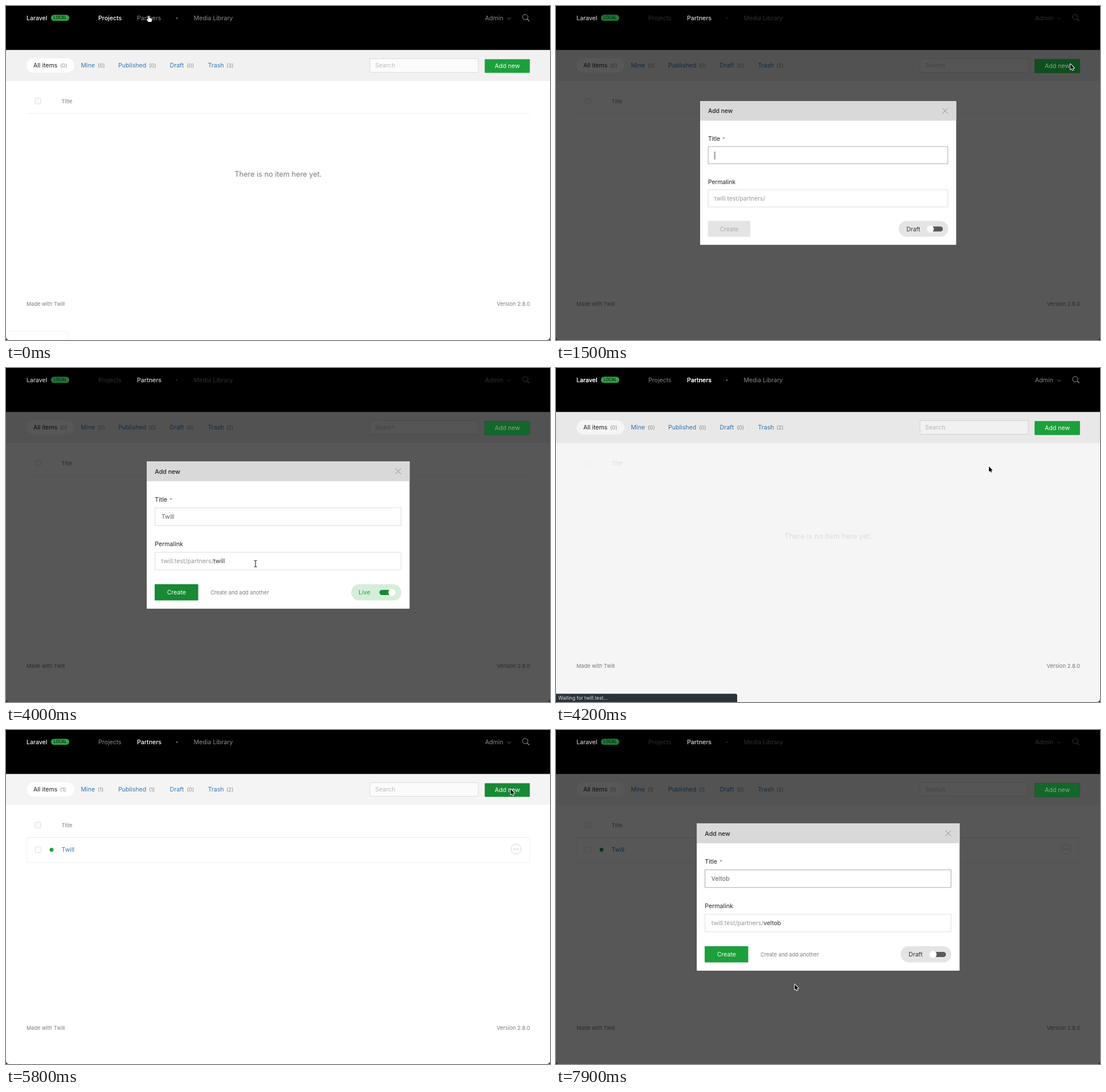
Animation, 955 px wide and 587 px high, one loop 8 s. Source, as an HTML page with a canvas:

```html
<!DOCTYPE html>
<html lang="en">
<head>
<meta charset="utf-8">
<title>Partners listing</title>
<style>
  html, body { margin: 0; width: 100%; height: 100%; overflow: hidden; background: #fff; }
  canvas { display: block; width: 955px; height: 587px; }
</style>
</head>
<body>
<canvas id="stage"></canvas>
<script>
const W = 955, H = 587, LOOP = 8000, STEP = 100;
const FONT = 'Inter, Roboto, sans-serif';
const GREEN = '#1d9f3c', GREEN_DARK = '#188934', BLUE = '#3278b8';
const NAME = 'Veltob';

const canvas = document.getElementById('stage');
const ctx = canvas.getContext('2d');
const dpr = window.devicePixelRatio || 1;
canvas.width = W * dpr;
canvas.height = H * dpr;

// time, x, y, pointer kind
const PATH = [
  [0, 251, 17, 'hand'], [500, 251, 17, 'hand'], [700, 330, 28, 'arrow'],
  [1300, 903, 102, 'arrow'], [1500, 903, 102, 'arrow'], [2000, 290, 262, 'beam'],
  [2200, 290, 262, ''], [3000, 297, 262, 'beam'], [3400, 668, 392, 'hand'],
  [3500, 668, 392, 'hand'], [3800, 310, 391, 'hand'], [3900, 345, 380, 'beam'],
  [4000, 438, 344, 'beam'], [4100, 600, 260, 'arrow'], [4200, 760, 173, 'arrow'],
  [4500, 876, 110, 'arrow'], [5300, 876, 110, 'arrow'], [5700, 886, 104, 'arrow'],
  [5900, 886, 104, 'arrow'], [6200, 334, 262, 'beam'], [6600, 297, 256, 'beam'],
  [7000, 297, 256, ''], [7700, 297, 256, 'beam'], [7800, 350, 345, 'beam'],
  [7900, 419, 447, 'arrow'], [8000, 419, 447, 'arrow']
];

// time, visibility of the dialog and its backdrop
const DIALOG = [
  [0, 0], [1300, 0], [1400, .5], [1500, 1], [4000, 1], [4100, .4], [4200, .06],
  [4300, 0], [5800, 0], [5900, .5], [6000, 1], [8000, 1]
];

function segment(keys, t) {
  let i = 0;
  while (i < keys.length - 2 && t >= keys[i + 1][0]) i++;
  const a = keys[i], b = keys[i + 1];
  return { a, b, p: (t - a[0]) / (b[0] - a[0]) };
}

const mix = (a, b, p) => a + (b - a) * p;

function track(keys, t) {
  const { a, b, p } = segment(keys, t);
  return mix(a[1], b[1], p);
}

function pointerAt(t) {
  const { a, b, p } = segment(PATH, t);
  const e = p * p * (3 - 2 * p);
  return { x: mix(a[1], b[1], e), y: mix(a[2], b[2], e), kind: a[3] };
}

// Text is placed by the middle of its capitals.
function text(str, x, y, color, size = 10.6, weight = 400, align = 'left') {
  ctx.font = `${weight} ${size}px ${FONT}`;
  ctx.fillStyle = color;
  ctx.textAlign = align;
  ctx.fillText(str, x, y + size * .364);
  return ctx.measureText(str).width;
}

function box(x, y, w, h, fill, stroke, r = 0) {
  ctx.beginPath();
  ctx.roundRect(x, y, w, h, r);
  if (fill) { ctx.fillStyle = fill; ctx.fill(); }
  if (stroke) { ctx.strokeStyle = stroke; ctx.lineWidth = 1; ctx.stroke(); }
}

function disc(x, y, r, fill, stroke) {
  box(x - r, y - r, 2 * r, 2 * r, fill, stroke, r);
}

function lines(color, width, ...parts) {
  ctx.strokeStyle = color;
  ctx.lineWidth = width;
  ctx.beginPath();
  for (const [x, y, ...rest] of parts) {
    ctx.moveTo(x, y);
    for (let i = 0; i < rest.length; i += 2) ctx.lineTo(rest[i], rest[i + 1]);
  }
  ctx.stroke();
}

function brand(color, badge) {
  text('Laravel', 36, 21, color, 10.5, 500);
  box(79, 15.5, 32, 10.5, badge, null, 5.2);
  text('LOCAL', 95, 20.8, '#0b2a12', 6.9, 600, 'center');
}

function nav(partners) {
  box(0, 0, W, 77.4, '#000');
  brand('#f4f4f4', '#2aa745');
  text('Projects', 162, 21, partners ? '#8c8c8c' : '#fff', 10.6, partners ? 400 : 500);
  text('Partners', 230, 21, partners ? '#fff' : '#8c8c8c', 10.6, partners ? 500 : 400);
  disc(300, 21.5, 1.4, '#666');
  text('Media Library', 329.5, 21, '#8c8c8c');
  text('Admin', 841, 21, '#8c8c8c');
  lines('#777', 1, [880, 20.5, 883, 23.5, 886, 20.5]);
  disc(911.5, 19.5, 4.7, null, '#a0a0a0');
  lines('#a0a0a0', 1.1, [915, 23, 918.5, 26.5]);
}

function addButton(fill, color) {
  box(840.4, 93.4, 79.2, 24.2, fill, null, 1);
  text('Add new', 880, 105.3, color, 10.6, 400, 'center');
}

function filters(counts, strip, pill, hover) {
  box(0, 77.4, W, 54.4, strip);
  box(36, 92, 84, 25, pill, null, 12.5);
  const tabs = [['All items', 48, 95], ['Mine', 131.5, 161], ['Published', 197, 251],
    ['Draft', 287.5, 317.5], ['Trash', 354.5, 387]];
  tabs.forEach(([label, x, countX], i) => {
    text(label, x, 104.3, i ? BLUE : '#222');
    text(`(${counts[i]})`, countX, 104.5, '#8a8a8a', 9.2);
  });
  box(639, 92.5, 190, 24, '#fbfbfb', '#dcdcdc');
  text('Search', 648, 104.3, '#bdbdbd');
  addButton(hover ? GREEN_DARK : GREEN, '#f2fff5');
}

function listing(t, filled) {
  const busy = t >= 4200 && t < 4500;
  ctx.globalAlpha = busy ? .2 : 1;
  box(51, 162, 10, 10, '#fafafa', '#dedede', 1);
  text('Title', 97.5, 167.3, '#7c7c7c', 9.2);
  lines('#f0f0f0', 1, [36, 188.8, 920, 188.8]);
  if (!filled) {
    text('There is no item here yet.', 477.7, 295.8, '#7c7c7c', 12.75, 400, 'center');
  } else {
    ctx.globalAlpha = Math.min(1, (t - 4700) / 300);
    box(36.5, 189, 883, 44, null, '#f0f0f0');
    box(51.5, 205.5, 10, 10, '#fff', '#dedede', 1);
    disc(80, 210.5, 3.4, GREEN);
    text('Twill', 97.5, 210.5, BLUE);
    disc(895.5, 209.3, 8.8, '#fff', '#d6d6d6');
    for (const dx of [-3.4, 0, 3.4]) disc(895.5 + dx, 209.3, .8, '#888');
  }
  ctx.globalAlpha = 1;
}

function page(t, hover) {
  const partners = t >= 500, reloaded = t >= 4500;
  const counts = reloaded ? [1, 1, 1, 0, 2] : [0, 0, 0, 0, partners ? 2 : 3];
  box(0, 0, W, H, '#fff');
  nav(partners);
  filters(counts, reloaded ? '#f4f4f4' : '#f1f1f1', '#fff', hover);
  listing(t, t >= 4800);
  text('Made with Twill', 36, 523.5, '#7c7c7c', 9.2);
  text('Version 2.8.0', 920, 523.5, '#7c7c7c', 9.45, 400, 'right');
}

function backdrop(k, hover) {
  box(0, 0, W, H, `rgba(0,0,0,${.66 * k})`);
  if (k < .1) {
    brand('#f4f4f4', '#2aa745');
    text('Partners', 230, 21, '#fff', 10.6, 500);
    addButton(GREEN, '#f2fff5');
    return;
  }
  ctx.globalAlpha = k;
  brand('#b4b4b4', '#1c7a33');
  text('Partners', 230, 21, '#c4c4c4', 10.6, 500);
  addButton(hover ? '#0f4f1e' : '#13672a', '#86a58d');
  ctx.globalAlpha = 1;
}

function toggle(live) {
  box(live ? 606 : 605, 380, live ? 88 : 89, 28.5, live ? '#d5eeda' : '#e4e4e4', null, 14.2);
  text(live ? 'Live' : 'Draft', 619, 394.5, live ? GREEN : '#333');
  box(live ? 655.5 : 660, 390, live ? 26 : 24.5, 9, live ? GREEN_DARK : '#595959', null, 4.5);
  disc(live ? 677.5 : 662, 394.5, 6.2, '#fff');
}

function fields(t) {
  const first = t < 5000;
  const start = first ? 2200 : 7000;
  let title = '', slug = '';
  if (first) {
    const n = t < 2200 ? 0 : t < 2500 ? 1 : Math.min(5, 2 + (t - 2500) / STEP);
    title = 'Twill'.slice(0, n);
    slug = t < 2300 ? '' : t < 3000 ? 't' : 'twill';
  } else {
    title = NAME.slice(0, Math.max(0, (t - start) / STEP + 1));
    slug = t < 7700 ? '' : NAME.toLowerCase();
  }
  const caret = first ? t < 2200 : t < 6800;
  return { title, slug, caret, ready: t >= start, live: first && t >= 3400,
    focus: !first || t < 3400, pressed: first && t >= 3700 };
}

function dialog(t, k) {
  const f = fields(t);
  const s = t === 1400 || t === 5900 ? .955 : t === 1500 || t === 6000 ? .974 : 1;
  ctx.save();
  ctx.globalAlpha = k;
  ctx.translate(478, 293.5);
  ctx.scale(s, s);
  ctx.translate(-478, -293.5);
  box(247, 164, 461.5, 259, '#fff', null, 1);
  box(247, 164, 461.5, 35, '#d9d9d9');
  text('Add new', 261.3, 181.8, '#222', 10.6, 500);
  lines('#888', 1, [683.5, 176.5, 693.5, 186.5], [693.5, 176.5, 683.5, 186.5]);

  const w = text('Title', 261.3, 231.3, '#222');
  text('*', 261.3 + w + 4, 231.6, '#888', 9.5);
  box(261.5, 245.8, 432, 31, '#fff', f.focus ? '#a8a8a8' : '#dcdcdc');
  text(f.title, 272.8, 261.4, '#5c5c5c');
  if (f.caret) lines('#333', 1, [273.5, 255, 273.5, 269]);

  text('Permalink', 261.3, 309.4, '#222');
  box(261.5, 323.8, 432, 31, '#fff', '#dedede');
  const base = text('twill.test/partners/', 272.8, 339.5, '#979797');
  text(f.slug, 272.8 + base, 339.5, '#333');

  box(261, 380, 76.5, 28.5, f.ready ? (f.pressed ? GREEN_DARK : GREEN) : '#e4e4e4', null, 1);
  text('Create', 299.3, 394.5, f.ready ? '#f4fff6' : '#ababab', 10.6, 400, 'center');
  if (f.ready) text('Create and add another', 359, 394.7, '#7c7c7c', 9.2);
  toggle(f.live);
  ctx.restore();
}

function statusBar(t) {
  const waiting = (t >= 100 && t < 500) || (t >= 4200 && t < 4500);
  if (t < 100) {
    box(-2, 571, 112, 20, '#fdfdfd', '#f3f3f3', 4);
  } else if (waiting) {
    ctx.globalAlpha = t === 100 ? .7 : 1;
    box(0, 572.5, 318, 15, '#27323a', null, [0, 3, 0, 0]);
    text('Waiting for twill.test...', 4, 580.3, '#dcdfe1', 8.5);
    ctx.globalAlpha = 1;
  }
}

function corners() {
  ctx.fillStyle = '#222';
  ctx.beginPath();
  ctx.moveTo(0, H - 6);
  ctx.quadraticCurveTo(0, H, 6, H);
  ctx.lineTo(0, H);
  ctx.moveTo(W, H - 6);
  ctx.quadraticCurveTo(W, H, W - 6, H);
  ctx.lineTo(W, H);
  ctx.fill();
}

const ARROW = new Path2D('M0 0V9.4L2.2 7.5L3.7 10.8L5.2 10.1L3.8 6.9H6.7Z');
const HAND = new Path2D('M-1.4 .8Q-.3 -.8 .8 .8V4L4.6 5Q5.4 5.4 5.2 6.6L4.3 11H-1.2L-4 7Q-4.2 5.4 -2.8 5.8L-1.4 7Z');

function pointer({ x, y, kind }) {
  if (!kind) return;
  ctx.save();
  ctx.translate(x, y);
  ctx.lineJoin = 'round';
  if (kind === 'beam') {
    const shape = [[-2.6, -5.5, -.8, -5.5, 0, -4.5, .8, -5.5, 2.6, -5.5],
      [0, -4.5, 0, 4.5], [-2.6, 5.5, -.8, 5.5, 0, 4.5, .8, 5.5, 2.6, 5.5]];
    lines('rgba(255,255,255,.8)', 2.4, ...shape);
    lines('#222', 1.1, ...shape);
  } else {
    const arrow = kind === 'arrow', shape = arrow ? ARROW : HAND;
    ctx.strokeStyle = arrow ? '#fff' : '#111';
    ctx.lineWidth = arrow ? 1.8 : 1.4;
    ctx.stroke(shape);
    ctx.fillStyle = arrow ? '#000' : '#fff';
    ctx.fill(shape);
  }
  ctx.restore();
}

function draw(t) {
  ctx.setTransform(dpr, 0, 0, dpr, 0, 0);
  const p = pointerAt(t), k = track(DIALOG, t);
  const hover = p.kind === 'arrow' && p.x > 838 && p.y > 90 && p.y < 118;
  page(t, hover);
  if (k > 0) backdrop(k, hover);
  if (k > .1) dialog(t, k);
  statusBar(t);
  corners();
  pointer(p);
}

const begin = performance.now();
function tick() {
  const t = (performance.now() - begin) % LOOP;
  draw(Math.floor(t / STEP) * STEP);
  requestAnimationFrame(tick);
}
tick();
</script>
</body>
</html>
```
